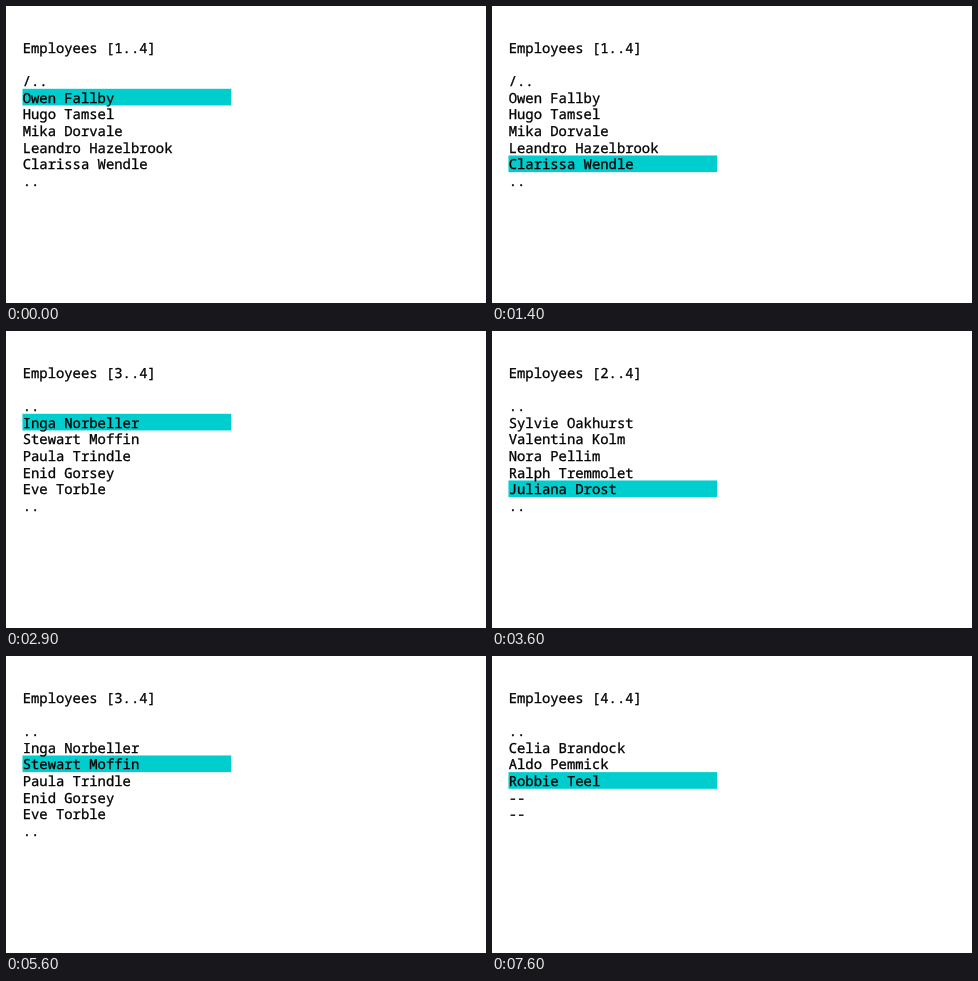
An HTML page for the animation above (8 s loop, 480 px wide and 297 px high).

```html
<!DOCTYPE html>
<html lang="en">
<head>
<meta charset="utf-8">
<title>Employee list</title>
<style>
  html, body { margin: 0; width: 100%; height: 100%; overflow: hidden; background: #fff; }
  svg { display: block; width: 100vw; height: 100vh; }
  text {
    font: 13.89px "Noto Sans Mono", "DejaVu Sans Mono", monospace;
    white-space: pre; fill: #000; stroke: #000; stroke-width: 0.3px;
    text-rendering: geometricPrecision;
  }
</style>
</head>
<body>
<svg viewBox="0 0 480 297" preserveAspectRatio="none">
  <rect id="bar" fill="#00cdcd"/>
  <g id="screen"></g>
</svg>
<script>
const LOOP = 8000;
const CELL = 25 / 3, LINE = 50 / 3;
const ROWS = 5;

const pages = [
  ["Owen Fallby", "Hugo Tamsel", "Mika Dorvale", "Leandro Hazelbrook", "Clarissa Wendle"],
  ["Sylvie Oakhurst", "Valentina Kolm", "Nora Pellim", "Ralph Tremmolet", "Juliana Drost"],
  ["Inga Norbeller", "Stewart Moffin", "Paula Trindle", "Enid Gorsey", "Eve Torble"],
  ["Celia Brandock", "Aldo Pemmick", "Robbie Teel"]
];

// Key presses: time and action (d = down, u = up, m = mark)
const keys = [
  [800, "d"], [1000, "d"], [1200, "d"], [1400, "d"], [1600, "d"], [1800, "d"],
  [2100, "d"], [2300, "d"], [2500, "d"], [2800, "d"], [3000, "d"],
  [3400, "u"], [3600, "u"], [3800, "u"], [4100, "u"], [4400, "m"],
  [4800, "d"], [5000, "d"], [5200, "d"], [5500, "d"], [5900, "d"], [6100, "d"],
  [6400, "m"], [6600, "d"], [6800, "d"], [7000, "d"], [7500, "d"]
];

const bar = document.getElementById("bar");
const screen = document.getElementById("screen");

function makeText(col, line) {
  const el = document.createElementNS("http://www.w3.org/2000/svg", "text");
  el.setAttribute("x", col * CELL);
  el.setAttribute("y", 46.6 + line * LINE);
  return screen.appendChild(el);
}

const title = makeText(2, 0);
const above = makeText(2, 2);
const names = [], marks = [];
for (let i = 0; i < ROWS; i++) {
  names.push(makeText(2, 3 + i));
  marks.push(makeText(1, 3 + i));
}
const below = makeText(2, 3 + ROWS);

bar.setAttribute("x", 2 * CELL - 0.2);
bar.setAttribute("width", 25 * CELL + 0.4);
bar.setAttribute("height", LINE);

function stateAt(t) {
  let cursor = 0;
  const marked = new Set();
  for (const [time, key] of keys) {
    if (time > t) break;
    if (key === "m") marked.add(cursor);
    else cursor += key === "d" ? 1 : -1;
  }
  return { cursor, marked };
}

function render(t) {
  const { cursor, marked } = stateAt(t);
  const page = Math.floor(cursor / ROWS);
  title.textContent = `Employees [${page + 1}..${pages.length}]`;
  above.textContent = page ? ".." : "/..";
  below.textContent = page < pages.length - 1 ? ".." : "";
  for (let i = 0; i < ROWS; i++) {
    names[i].textContent = pages[page][i] || "--";
    marks[i].textContent = marked.has(page * ROWS + i) ? "+" : "";
  }
  bar.setAttribute("y", 82.8 + (cursor % ROWS) * LINE);
}

const start = performance.now();
function tick() {
  render((performance.now() - start) % LOOP);
  requestAnimationFrame(tick);
}
tick();
</script>
</body>
</html>
```
